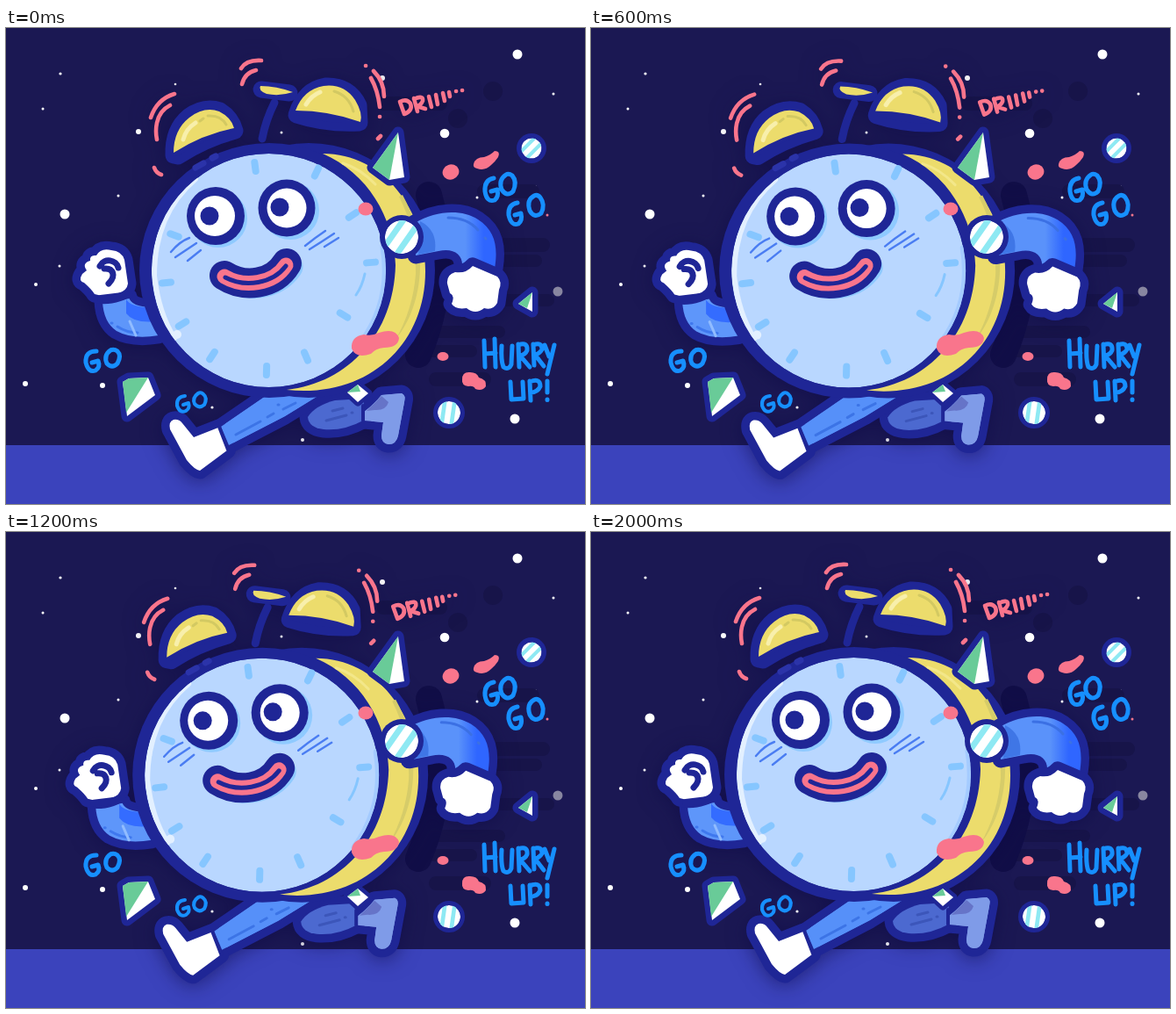
An HTML page for the animation above (2.2 s loop, 660x542 px).

```html
<!DOCTYPE html>
<html lang="en">
<head>
<meta charset="utf-8">
<title>Running alarm clock</title>
<style>
html, body { margin: 0; width: 100%; height: 100%; overflow: hidden; background: #1b1853; }
svg { display: block; width: 100vw; height: 100vh; }
path, line { stroke-linecap: round; stroke-linejoin: round; }
.ink { fill: #1f2696; }
.rim { stroke: #1f2696; stroke-width: 19; paint-order: stroke; }
.thin { stroke-width: 13; }
.line { fill: none; stroke: #1f2696; }
.mark { fill: none; stroke-width: 3; }
.pink { fill: #f9758c; }
.ring { fill: none; stroke: #f9758c; stroke-width: 4.6; }
.word { fill: none; stroke: #168fff; stroke-width: 5; }
.tick { fill: none; stroke: #86c6ff; stroke-width: 8; }
.blush { fill: none; stroke: #4a7df2; stroke-width: 2.4; }
.streak { fill: none; stroke: #171449; }
.white { fill: #fff; }
.green { fill: #69cb98; }
.yellow { fill: #ecdc6c; }
.sleeve { fill: #5690f9; }
#runner { filter: drop-shadow(0 3px 11px rgba(12, 9, 70, .55)); }
</style>
</head>
<body>
<svg viewBox="0 0 660 542" preserveAspectRatio="none">
  <defs>
    <linearGradient id="arm" x1="0" x2="1">
      <stop offset="0" stop-color="#5a92fa"/><stop offset=".62" stop-color="#5a92fa"/><stop offset=".85" stop-color="#2f66ff"/>
    </linearGradient>
    <clipPath id="dial"><ellipse cx="299.5" cy="276" rx="133.5" ry="133"/></clipPath>
    <clipPath id="disc"><circle r="1"/></clipPath>
  </defs>
  <rect width="660" height="542" fill="#1b1853"/>
  <g id="stars"></g>
  <g class="streak">
    <path d="M430 86H495M545 186H600M500 247H612M490 400H545" stroke-width="16"/>
    <path d="M490 265H604M560 310H618M490 346H562M480 368H530" stroke-width="14"/>
    <path d="M482 190Q508 280 470 372" style="stroke:#110e47" stroke-width="30"/>
    <path d="M555 72h.1M515 103h.1" stroke-width="22"/>
  </g>
  <rect y="475" width="660" height="67" fill="#3b43bc"/>

  <g id="runner">
    <!-- rear leg -->
    <path class="rim" fill="#7f9be8" d="M408 437Q420 428 428 418L451 416Q456 418 454 426L447 464Q445 474 436 474Q428 473 428 464L430 449L408 447Z"/>
    <path class="rim" fill="#4c69d0" d="M344 443Q352 430 375 424L408 422L407 447Q385 459 362 457Q345 455 344 443Z"/>
    <path fill="#7f9be8" d="M408 437Q420 428 428 418L451 416Q456 418 454 426L447 464Q445 474 436 474Q428 473 428 464L430 449L408 447Z"/>
    <path fill="#6674c8" d="M411 436L428 419L436 426Q433 436 420 435Z"/>
    <path class="line" stroke-width="4" d="M407 430V447"/>
    <path class="mark" stroke="#3c56ba" d="M365 447L388 441M394 438l1 0M372 436L384 433"/>
    <!-- front leg -->
    <path class="rim sleeve" d="M245 454L302 415H362L318 442L254 475Z"/>
    <path class="rim white" d="M187 457Q185 448 191 446Q197 445 201 450L214 466L242 455L252 481L221 504Q215 503 206 492Z"/>
    <path class="sleeve" d="M245 454L302 415H362L318 442L254 475Z"/>
    <path class="line" stroke-width="4" d="M243 454L253 480"/>
    <path class="mark" stroke="#3c74e6" d="M262 463L290 448M298 443l7 -4M310 429l1 0M316 434L330 427"/>
    <!-- left arm -->
    <path class="rim" fill="#5e96fa" d="M110 311L140 306Q142 318 168 318L174 350Q144 355 126 345Q111 335 110 311Z"/>
    <path fill="#346cff" d="M137 309Q143 319 168 318L172 334Q146 337 137 325Z"/>
    <path class="mark" stroke="#3f78ee" d="M120 336l1 0M127 340Q138 347 150 347"/>
    <path class="mark" stroke="#91bcff" d="M141 334L148 350"/>
    <path class="rim white" d="M89 290Q82 288 87 280L92 276Q86 268 96 265Q95 258 103 259Q108 250 120 253Q132 254 135 264L139 291Q138 299 128 302Q112 307 101 303Q98 298 89 290Z"/>
    <path class="line" stroke-width="7" d="M107 271C112 261 126 264 128 273M112 274C122 273 126 282 117 291"/>
    <path class="line" stroke-width="8" d="M108 308L141 304"/>

    <!-- body -->
    <ellipse class="ink" cx="345" cy="276" rx="144" ry="145"/>
    <ellipse class="ink" cx="300" cy="276" rx="148" ry="145"/>
    <path class="yellow" d="M361 143C431 143 478 208 478 277C478 362 411 422 320 412C391 404 442 348 444 270C442 215 412 165 361 143Z"/>
    <path fill="#d6cc69" d="M452 190C480 240 480 310 444 355Q464 320 467 280Q468 230 448 192Z"/>
    <path class="mark" stroke="#f3e789" d="M384 154Q404 160 421 178"/>
    <g clip-path="url(#dial)">
      <ellipse cx="299.5" cy="276" rx="133.5" ry="133" fill="#b9d7ff"/>
      <path d="M216 172Q169 212 169 282Q174 325 192 353" fill="none" stroke="#e3f0ff" stroke-width="6"/>
      <path d="M405 358Q440 310 430 250" fill="none" stroke="#a4cbff" stroke-width="7"/>
    </g>
    <g id="ticks" class="tick"></g>
    <path class="mark" stroke="#86c6ff" d="M409 280Q406 294 399 304"/>
    <circle cx="195" cy="349" r="5" fill="#e3f0ff"/>
    <path class="mark" stroke="#2b33a9" style="stroke-width:7" d="M216 159l9 -5M235 148l4 -2"/>

    <!-- face -->
    <g fill="#8fcaff"><circle cx="242" cy="217" r="33"/><circle cx="324" cy="208" r="33"/></g>
    <g class="ink"><circle cx="239" cy="214" r="33"/><circle cx="320" cy="205" r="32.5"/></g>
    <g class="white"><circle cx="238" cy="214" r="23"/><circle cx="320" cy="205" r="22.5"/></g>
    <g class="ink"><circle cx="232" cy="214" r="10.5"/><circle cx="312" cy="204" r="10.5"/></g>
    <path class="blush" d="M188 255Q198 243 209 239M193 261L217 245M207 265L222 253M341 248Q352 239 364 231M346 252Q359 244 374 234M363 249L379 239"/>
    <path class="mark" stroke="#8fcaff" style="stroke-width:31" d="M253 285C275 298 308 294 323 272"/>
    <path class="line" stroke-width="34" d="M249 282C271 296 305 293 320 268"/>
    <path class="ring" style="stroke-width:17" d="M249 283C271 296 305 292 319 270"/>
    <path class="line" stroke-width="5" d="M250 284C273 296 304 291 319 271"/>

    <!-- hammer and bells -->
    <path class="line" stroke-width="9" d="M306 85Q296 105 292 126"/>
    <path class="line" stroke-width="19" d="M291 70L323 74"/>
    <path class="yellow" d="M290 66Q308 66 327 73Q312 78 297 75Q287 71 290 66Z"/>
    <path class="rim ink" d="M191 145Q190 116 208 101Q226 88 244 94Q257 102 261 117Q225 127 196 146Z"/>
    <path class="yellow" d="M191 142Q191 116 209 102Q226 89 243 95Q257 102 260 114Q224 121 191 142Z"/>
    <path class="rim ink" d="M331 99Q340 70 364 66Q391 65 402 88L403 108Q365 110 331 99Z"/>
    <path class="yellow" d="M330 94Q339 70 362 66Q385 63 398 82Q407 97 404 107Q368 94 330 94Z"/>
    <path class="mark" stroke="#f8efab" style="stroke-width:5" d="M202 127Q205 115 216 108M342 87Q348 77 358 73"/>
    <path class="mark" stroke="#d3c962" d="M230 100Q245 99 251 110M221 106l4 -3M374 72Q391 77 396 95"/>

    <!-- ringing -->
    <path class="ring" d="M192 75Q172 81 165 102M187 88Q175 94 172 108Q170 117 172 127M169 159Q171 165 177 167M268 46Q274 36 291 37M269 64Q272 51 285 48M410 43h.1M419 49Q431 61 431 78M416 57Q424 71 426 90M426 101h.1M427 123L424 126"/>
    <path class="ring" role="img" aria-label="DRIIII..." d="M449 84L454 98Q464 94 461 86Q457 80 449 84M465 80L469 95M465 81Q476 76 475 83Q473 88 468 89L478 92M482 78L485 90M490 76L492 87M498 74L500 83M505 73L506 78M513 72h.1M520 71h.1"/>

    <!-- right arm -->
    <path class="rim" fill="url(#arm)" d="M466 222C490 208 519 206 538 218C558 231 561 250 557 274L520 271C521 258 510 250 493 254L467 259Z"/>
    <path class="mark" stroke="#3b70e4" d="M504 216Q526 216 538 230M546 239l1 1"/>
    <path fill="#3f76e6" d="M472 220Q492 230 489 254L470 258Z"/>
    <path class="rim white" d="M503 291Q502 281 512 278Q524 280 532 271L560 283Q566 289 562 298L560 313Q555 322 545 319Q535 327 525 319Q512 321 508 314Q512 305 506 302Z"/>
  </g>

  <!-- floating bits -->
  <path class="rim thin white" d="M447 119L454 170L437 173L418 159Z"/>
  <path class="green" d="M447 119L437 173L418 159Z"/>
  <path class="rim thin white" d="M600 301V323L584 314Z"/>
  <path class="green" d="M600 301L594 319L584 314Z"/>
  <path class="rim thin white" d="M133 403L140 399L162 398L170 418L138 442Z"/>
  <path class="green" d="M133 403L140 399L162 398L137 438Z"/>
  <path class="rim white" style="stroke-width:9" d="M389 415L401 406L413 416L401 426Z"/>
  <path class="green" d="M389 415L401 406L404 414Z"/>
  <g id="balls"></g>
  <g class="pink">
    <ellipse cx="507" cy="164" rx="9.5" ry="8.5" transform="rotate(-20 507 164)"/>
    <ellipse cx="410" cy="206" rx="8.5" ry="7.5"/>
    <ellipse cx="498" cy="374" rx="6.5" ry="5"/>
    <path d="M533 155Q535 147 545 147Q552 145 557 140Q564 140 561 147Q557 153 553 156Q546 163 537 160Q532 159 533 155Z"/>
    <path d="M394 365Q393 351 408 349Q417 351 425 347Q444 341 448 353Q447 364 431 364Q421 365 416 371Q399 377 394 365Z"/>
    <path d="M520 400Q520 391 529 392Q537 392 539 398Q548 400 547 408Q543 414 535 411Q533 407 527 408Q519 407 520 400Z"/>
  </g>

  <!-- hand lettering -->
  <g class="word">
    <path role="img" aria-label="GO" d="M556 171Q545 173 546 186Q548 199 557 196Q562 192 560 184L553 186M570 167Q561 173 565 184Q571 193 578 186Q583 175 577 168Q573 165 570 167"/>
    <path role="img" aria-label="GO" d="M583 199Q572 201 573 213Q576 226 584 223Q589 219 587 211L580 213M602 191Q593 196 597 208Q602 217 610 211Q615 201 609 193Q606 189 602 191"/>
    <path role="img" aria-label="HURRY" d="M545 356L546 386M557 354L558 386M546 371L558 370M565 362Q564 379 567 386Q573 390 576 383L577 362M584 360L585 386M584 361Q595 357 594 367Q592 372 586 373L597 386M601 360L602 384M601 361Q611 357 611 366Q608 371 603 372L613 385M614 361L619 374M625 361L617 394"/>
    <path role="img" aria-label="UP!" d="M575 403L576 423L590 422L589 403M597 402L598 424M597 403Q609 398 609 408Q606 415 598 415M617 402L617 415M617 423v.5"/>
    <path role="img" aria-label="GO" d="M103 368Q90 368 91 381Q94 393 102 390Q108 386 105 379L98 381M119 367Q111 373 115 382Q121 388 127 382Q132 373 127 368Q123 365 119 367"/>
    <path role="img" aria-label="GO" style="stroke-width:4" d="M204 419Q194 420 195 430Q198 439 205 436Q210 433 208 427L202 429M219 416Q212 421 215 428Q220 434 226 429Q230 421 225 417Q222 414 219 416"/>
  </g>
</svg>
<script>
const fill = (id, markup) => { document.getElementById(id).innerHTML = markup; };

const stars = [
  [62, 52, 1.6], [42, 92, 1.5], [151, 118, 3], [193, 64, 1.3], [128, 191, 1.5],
  [67, 212, 5.5], [61, 271, 1.5], [34, 292, 2], [22, 405, 3], [110, 407, 3],
  [583, 30, 5.5], [624, 75, 1.5], [500, 120, 5.3], [429, 57, 3], [603, 181, 2],
  [537, 193, 1.5], [580, 445, 5.5], [235, 432, 1.6], [497, 351, 1.5], [338, 469, 2], [314, 119, 1.5]
];
fill("stars", stars.map(([x, y, r]) => `<circle cx="${x}" cy="${y}" r="${r}" fill="#fff"/>`).join("") +
  '<circle cx="629" cy="300" r="5.5" fill="#8886a0"/><circle cx="617" cy="213" r="1.5" fill="#f9758c"/>');

// Hour marks point at the middle of the dial.
const ticks = [
  [284, 158], [354, 164], [395, 213], [416, 267], [385, 327], [342, 374],
  [297, 390], [235, 373], [201, 337], [183, 290], [192, 236]
];
fill("ticks", ticks.map(([x, y]) => {
  const a = Math.atan2(y - 276, x - 300), dx = 5 * Math.cos(a), dy = 5 * Math.sin(a);
  return `<line x1="${x - dx}" y1="${y - dy}" x2="${x + dx}" y2="${y + dy}"/>`;
}).join(""));

// Striped balls: x, y, outer radius, inner radius, stripe angle.
const balls = [[451, 238, 25, 19, 35], [599, 137, 17, 11.5, 45], [505, 438, 18, 13, 8]];
fill("balls", balls.map(([x, y, R, r, a]) => `<g transform="translate(${x} ${y})">
  <circle class="ink" r="${R}"/>
  <g transform="rotate(${a}) scale(${r})" clip-path="url(#disc)"><circle class="white" r="1"/>
  <path d="M-.5-1V1M.35-1V1" stroke="#8ee9f3" stroke-width=".36"/></g></g>`).join(""));

const runner = document.getElementById("runner");
const STEP = 200, STEPS = 11;

function draw(now) {
  const step = Math.floor(now / STEP) % STEPS;
  const k = 5 - Math.abs(5 - step);
  runner.setAttribute("transform", `translate(${-1.95 * k} ${0.2 * k})`);
}

const start = performance.now();
function loop() {
  draw(performance.now() - start);
  requestAnimationFrame(loop);
}
draw(0);
loop();
</script>
</body>
</html>
```
